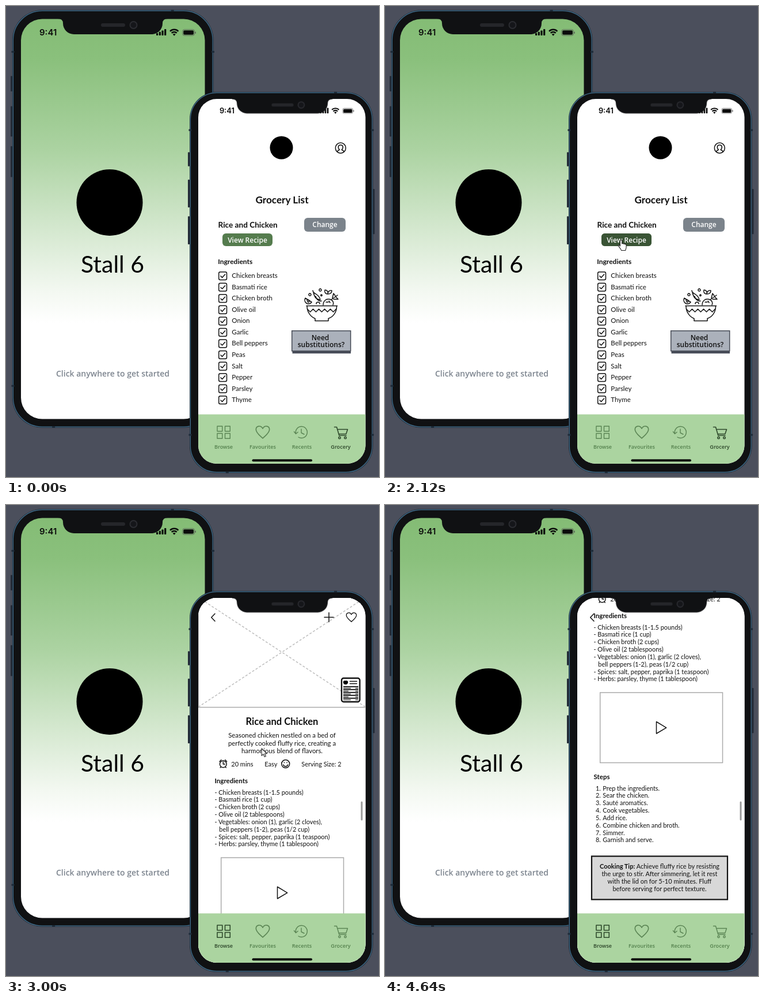
Recreate the animation shown at these times as an HTML page. Size 648x816 px, loop 4670 ms.

```html
<!DOCTYPE html>
<html lang="en">
<head>
<meta charset="utf-8">
<title>Grocery app mockup</title>
<style>
  html, body { margin: 0; width: 100%; height: 100%; overflow: hidden; background: #4b4f5c; }
  svg { display: block; width: 648px; height: 816px; }
  text { font-family: Lato, sans-serif; fill: #111; }
  .ui { font-family: "Open Sans", sans-serif; font-weight: 600; }
  .clock { font: 600 15px Inter, sans-serif; fill: #0b0b0b; }
  .mid { text-anchor: middle; }
  .bold { font-weight: 700; }
  .line { fill: none; stroke: #111; stroke-width: 1.5; stroke-linecap: round; stroke-linejoin: round; }
  .tab .line { stroke: #5b8554; stroke-width: 1.4; }
  .tab text { fill: #54804d; }
  .tab.on .line { stroke: #2f4a2c; stroke-width: 1.6; }
  .tab.on text { fill: #2c4529; }
</style>
</head>
<body>
<svg id="stage" viewBox="0 0 648 816" xmlns="http://www.w3.org/2000/svg"></svg>
<script>
const LOOP = 4670;

const text = (x, y, size, str, cls = '', extra = '') =>
  `<text x="${x}" y="${y}" font-size="${size}" class="${cls}" ${extra}>${str}</text>`;
const rect = (x, y, w, h, fill, r = 0, extra = '') =>
  `<rect x="${x}" y="${y}" width="${w}" height="${h}" rx="${r}" fill="${fill}" ${extra}/>`;
const line = (d, extra = '') => `<path class="line" d="${d}" ${extra}/>`;
const ring = (x, y, r, extra = '') => `<circle class="line" cx="${x}" cy="${y}" r="${r}" ${extra}/>`;
const rows = (list, fn) => list.map(fn).join('');

// Phone body with side buttons and antenna gaps
function body(x, y, w, h, r) {
  const side = (sx, from, to) => rect(sx, y + h * from, 3, h * (to - from), '#242c38', 1);
  const gap = (gx, gy) => rect(gx - 2.5, gy - 1.5, 5, 3, '#1d2b39');
  return side(x - 3, .158, .195) + side(x - 3, .23, .303) + side(x - 3, .326, .4) +
    side(x + w, .2545, .373) +
    rect(x, y, w, h, '#17232e', r) +
    rect(x + 1.4, y + 1.4, w - 2.8, h - 2.8, '#101113', r - 1.4, 'stroke="#42708f" stroke-width="1.2"') +
    gap(x + w * .796, y + 1) + gap(x + w * .205, y + h - 1) +
    rows([.1, .9], k => gap(x + 1, y + h * k) + gap(x + w - 1, y + h * k));
}

const notch = `
  <path d="M90 19V22Q99 22 99 30A19 19 0 0 0 118 49H253A19 19 0 0 0 272 30Q272 22 281 22V19Z" fill="#101113"/>
  ${rect(165, 30, 42, 6, '#25262a', 3)}
  <circle cx="221.5" cy="33" r="6" fill="#15161a" stroke="#2b2c31" stroke-width="2"/>`;

const status = text(58, 51, 15, '9:41', 'clock') +
  rows([0, 1, 2, 3], i => rect(261 + i * 4.7, 47 - i * 2.3, 3.2, 4 + i * 2.3, '#0b0b0b', .8)) +
  `<g fill="none" stroke="#0b0b0b" stroke-width="2.4">
    <path d="M285 43.8a10.2 10.2 0 0 1 14.4 0M287.7 46.9a6.4 6.4 0 0 1 9 0"/></g>
  <path d="M292.2 51.8l-2.5-2.7a3.7 3.7 0 0 1 5 0z" fill="#0b0b0b"/>` +
  rect(306.8, 40.8, 20.6, 10.4, 'none', 3, 'stroke="#555" stroke-width=".8"') +
  rect(308.2, 42.2, 17.8, 7.6, '#0b0b0b', 1.8) + rect(328.4, 44.4, 1.3, 3.4, '#555', .6);

const heart = (x, y, k) => `<g transform="translate(${x} ${y}) scale(${k})">` +
  line('M0 9C-4 5-10 1-10-4C-10-9.5-3-11 0-5.5C3-11 10-9.5 10-4C10 1 4 5 0 9Z') + '</g>';

function tabs(active) {
  const icons = [
    rows([[367, 728], [380.5, 728], [367, 740.5], [380.5, 740.5]], ([x, y]) => line(`M${x} ${y}h8.8v8.8h-8.8z`)),
    heart(446, 738.5, 1.17),
    line('M503.5 740.5A10 10 0 1 1 508 747M500.5 737.5l3 3.8 3.6-3M513 733v6.5l5 2.5'),
    line('M570.5 729.5h4l4.3 14.5h12.2M575.8 733.5h17.7l-2.7 8h-12.5') +
      ring(579.5, 748, 1.7) + ring(589.5, 748, 1.7)
  ];
  const names = ['Browse', 'Favourites', 'Recents', 'Grocery'], at = [378, 446, 514, 581.5];
  return rect(333, 707.5, 293, 95, '#abd4a0') +
    rows(names, (n, i) => `<g class="tab ${i === active ? 'on' : ''}">${icons[i]}${text(at[i], 767, 9.1, n, 'ui mid')}</g>`) +
    rect(427.5, 785.3, 104.5, 4, '#0b0b0b', 2);
}

const bowl = line('M522 519.5H575.5M523 520C523 531 530 539 537 541.5V545.5H560V541.5C568 539 574.5 531 574.5 520', 'stroke-width="2"') +
  line('M523.5 525l5 5 5-5 5 5 5-5 5 5 5-5 5 5 5-5 5 5 5-5') +
  line('M551 518c0-7 5-11 11-10 6 1 8 6 6 10M566 508l10-7M567 506l2-8 3 4M569 508l8 0-4-4M556 513h4M561 511l2 3') +
  line('M534 496c2 10 7 13 12 13-1-6-6-9-12-13zM533 493l1 3M538 503c1 5 5 9 10 8') +
  line('M520 506a6 6 0 0 0 11 7zM526 509v5M523 509l1 4') +
  line('M554 492c4 0 6 3 5 7-4 0-6-3-5-7zM559 499c0-4 3-7 7-6 0 4-3 6-7 6z') +
  line('M546 490a2 2 0 1 1-.1 0M528 498a2 2 0 1 1-.1 0M539 516a3 3 0 0 1 6 0M548 500a1.2 1.2 0 1 1-.1 0');

const foods = ['Chicken breasts', 'Basmati rice', 'Chicken broth', 'Olive oil', 'Onion', 'Garlic',
  'Bell peppers', 'Peas', 'Salt', 'Pepper', 'Parsley', 'Thyme'];

const listPage = rect(333, 158, 293, 640, '#fff') +
  `<g transform="translate(321 142.1) scale(.86)">${status}</g>
  <circle cx="478.5" cy="245.5" r="20"/>` +
  ring(581.3, 246, 9) + line('M575.8 252.2c.4-2.2 2.5-2.4 3.7-3-4-3.8-2.2-8.4 1.8-8.4s5.8 4.6 1.8 8.4c1.2.6 3.3.8 3.7 3') +
  text(479.5, 342, 17.2, 'Grocery List', 'mid bold') +
  text(368.5, 384, 13.6, 'Rice and Chicken', 'bold') +
  rect(518, 367, 72, 24, '#7b838b', 6) + text(554, 383.3, 12, 'Change', 'ui mid', 'style="fill:#fff"') +
  rect(376, 394, 87, 22, '#557c4e', 6) + rect(376, 394, 87, 22, '#3a5435', 6, 'id="hover"') +
  text(419.5, 409.6, 12, 'View Recipe', 'ui mid', 'style="fill:#fff"') +
  text(368.3, 446.5, 12, 'Ingredients', 'bold') +
  rows(foods, (f, i) => {
    const y = 467.5 + i * 19.55;
    return rect(369.7, y - 6.8, 13.8, 13.8, 'none', 2.5, 'stroke="#111" stroke-width="1.5"') +
      line(`M373 ${y + .4}l2.6 2.6 5-5.6`) + text(392.3, y + 3.6, 11.5, f);
  }) + bowl +
  rect(497.5, 566, 101.5, 36, '#4a4f5b') +
  rect(496.7, 562.7, 102, 35, '#abb1bb', 0, 'stroke="#454a55" stroke-width="1.5"') +
  text(546, 579, 12, 'Need', 'ui mid') + text(547.5, 591, 12, 'substitutions?', 'ui mid') +
  tabs(3);

const amounts = ['- Chicken breasts (1-1.5 pounds)', '- Basmati rice (1 cup)', '- Chicken broth (2 cups)',
  '- Olive oil (2 tablespoons)', '- Vegetables: onion (1), garlic (2 cloves),', 'bell peppers (1-2), peas (1/2 cup)',
  '- Spices: salt, pepper, paprika (1 teaspoon)', '- Herbs: parsley, thyme (1 tablespoon)'];
const steps = ['Prep the ingredients.', 'Sear the chicken.', 'Sauté aromatics.', 'Cook vegetables.', 'Add rice.',
  'Combine chicken and broth.', 'Simmer.', 'Garnish and serve.'];
const blurb = ['Seasoned chicken nestled on a bed of', 'perfectly cooked fluffy rice, creating a', 'harmonious blend of flavors.'];
const tip = ['<tspan font-weight="700">Cooking Tip:</tspan> Achieve fluffy rice by resisting',
  'the urge to stir. After simmering, let it rest', 'with the lid on for 5-10 minutes. Fluff', 'before serving for perfect texture.'];

const facts = rect(583, 300, 31.6, 41, '#fff', 3.5, 'stroke="#111" stroke-width="2.4"') +
  '<path d="M590 304.5c-6-2-5 7 0 6.5 5 .5 6-8.5 0-6.5l1-2"/>' +
  line('M597.5 305.5h12M597.5 309.5h12', 'stroke-width="1.2"') +
  rows([0, 1, 2, 3, 4], i => rect(586, 313.8 + i * 5, 26, 1.9, '#111') +
    rect(586, 316.9 + i * 5, 13 - i % 2 * 4, 1.2, '#333') + rect(607, 316.9 + i * 5, 5, 1.2, '#333'));

const recipe = rect(334, 159.5, 290.5, 191, '#fff', 0, 'stroke="#aaa" stroke-width="1.5"') +
  '<path d="M334 160L624.5 350M624.5 160L334 350" stroke="#bdbdbd" stroke-width="1.5" stroke-dasharray="4 3"/>' +
  line('M553 194.5h16M561 186.5v16') + heart(600, 194.5, .87) + facts +
  text(479.5, 381, 16.6, 'Rice and Chicken', 'mid bold') +
  rows(blurb, (s, i) => text(479.5, 403 + i * 13.5, 11.35, s, 'mid')) +
  ring(377.3, 448.8, 5.9) + line('M377.3 445v4h3M371 444.5l3-3M383.6 444.5l-3-3M373.5 453.5l-1.3 1.5M381 453.5l1.3 1.5') +
  text(391.3, 453, 11, '20 mins') + text(449.3, 453, 11, 'Easy') +
  ring(485.7, 448.6, 7) + line('M481.7 450a4.2 4.2 0 0 0 8 0M483.3 446v.6M488.1 446v.6') +
  text(513.3, 453, 10.9, 'Serving Size: 2') +
  text(362.5, 482, 11.5, 'Ingredients', 'bold') +
  rows(amounts, (s, i) => text(i === 5 ? 370.3 : 362.5, 501.5 + i * 12.85, 10.9, s)) +
  rect(373.7, 611, 212.8, 121.5, '#fff', 0, 'stroke="#aaa" stroke-width="1.5"') +
  line('M471.5 661.5V682L488.7 671.8Z') +
  text(362.5, 761, 11.5, 'Steps', 'bold') +
  rows(steps, (s, i) => text(366, 780.5 + i * 12.85, 10.9, i + 1 + '.') + text(378.3, 780.5 + i * 12.85, 10.9, s)) +
  rect(359, 894.5, 236, 75, '#d8d8d8', 0, 'stroke="#111" stroke-width="2.2"') +
  rows(tip, (s, i) => text(477, 916 + i * 12.85, 11, s, 'mid'));

const recipePage = rect(333, 158, 293, 700, '#fff') + `<g id="scroll">${recipe}</g>` +
  line('M363 188.3L356.8 194.7L363 201.2') + rect(616.5, 513.5, 3, 33, '#9a9a9a', 1.5) + tabs(0);

const cursor = `<g id="cursor" stroke="#222" stroke-width="1.1" stroke-linejoin="round" fill="#fff">
  <path id="arrow" d="M0 0V12.5L3 9.8 5 14.5 7.3 13.5 5.3 9H9.2Z"/>
  <path id="hand" d="M3.5 11V2a1.6 1.6 0 0 1 3.2 0V7a1.5 1.5 0 0 1 2.8 .4 1.5 1.5 0 0 1 2.6 .6
    1.3 1.3 0 0 1 2 1.2V13c0 2-1 3-1.3 5.5H5.5C5 15.5 1.5 13 .6 10.8 0 9.2 2 8.6 3.5 11Z"/></g>`;

const fade = [[0, '#84bc75'], [.1, '#8ac07c'], [.26, '#a1cd96'], [.33, '#acd3a2'],
  [.5, '#cfe5c9'], [.68, '#f3f8f1'], [.76, '#fff']];

document.getElementById('stage').innerHTML = `
  <defs>
    <linearGradient id="fade" x2="0" y2="1">${rows(fade, ([o, c]) => `<stop offset="${o}" stop-color="${c}"/>`)}</linearGradient>
    <clipPath id="screen"><rect x="334" y="161" width="290.5" height="632" rx="32"/></clipPath>
  </defs>
  ${rect(0, 0, 648, 816, '#4b4f5c')}
  ${body(11, 7, 349.5, 723.5, 52)}
  ${rect(26, 22.5, 319.5, 693, 'url(#fade)', 37)}
  ${status}${notch}
  <circle cx="180" cy="340.5" r="57.5"/>
  ${text(185, 462, 41, 'Stall 6', 'mid', 'style="fill:#000"')}
  ${text(185.5, 642, 14, 'Click anywhere to get started', 'ui mid', 'style="fill:#7d858f"')}
  ${body(319, 149, 318.5, 660, 47)}
  <g clip-path="url(#screen)">${listPage}<g id="sheet">${recipePage}</g>${cursor}</g>
  <g transform="translate(310.6 141.3) scale(.913)">${notch}</g>`;

// Each key: [ms, value, easing to the next key]
function play(id, prop, keys) {
  const all = [[0, keys[0][1]], ...keys, [LOOP, keys[keys.length - 1][1]]];
  document.getElementById(id).animate(
    all.map(([ms, value, easing = 'linear']) => ({ offset: ms / LOOP, [prop]: value, easing })),
    { duration: LOOP, iterations: Infinity });
}
const move = (x, y) => `translate(${x}px, ${y}px)`;
const show = (id, from, to) => play(id, 'opacity', [[from, 0], [from, 1], [to, 1], [to, 0]]);

show('hover', 1640, 4660);
show('hand', 1640, 2645);
play('arrow', 'opacity', [[1640, 1], [1640, 0], [2645, 0], [2645, 1]]);
play('cursor', 'transform', [
  [1060, move(322, 215)],
  [1300, move(376, 291)],
  [1700, move(405, 405)],
  [2860, move(405, 405), 'ease-in-out'],
  [3200, move(515, 452)],
  [3480, move(515, 452), 'ease-in-out'],
  [3940, move(533, 217)],
  [4200, move(540, 140)]
]);
play('sheet', 'transform', [[2520, move(0, 640), 'ease-out'], [2820, move(0, 0)]]);
play('scroll', 'transform', [
  [3250, move(0, 0), 'ease-in'],
  [3420, move(0, -85), 'ease-out'],
  [3800, move(0, -286)]
]);
</script>
</body>
</html>
```
